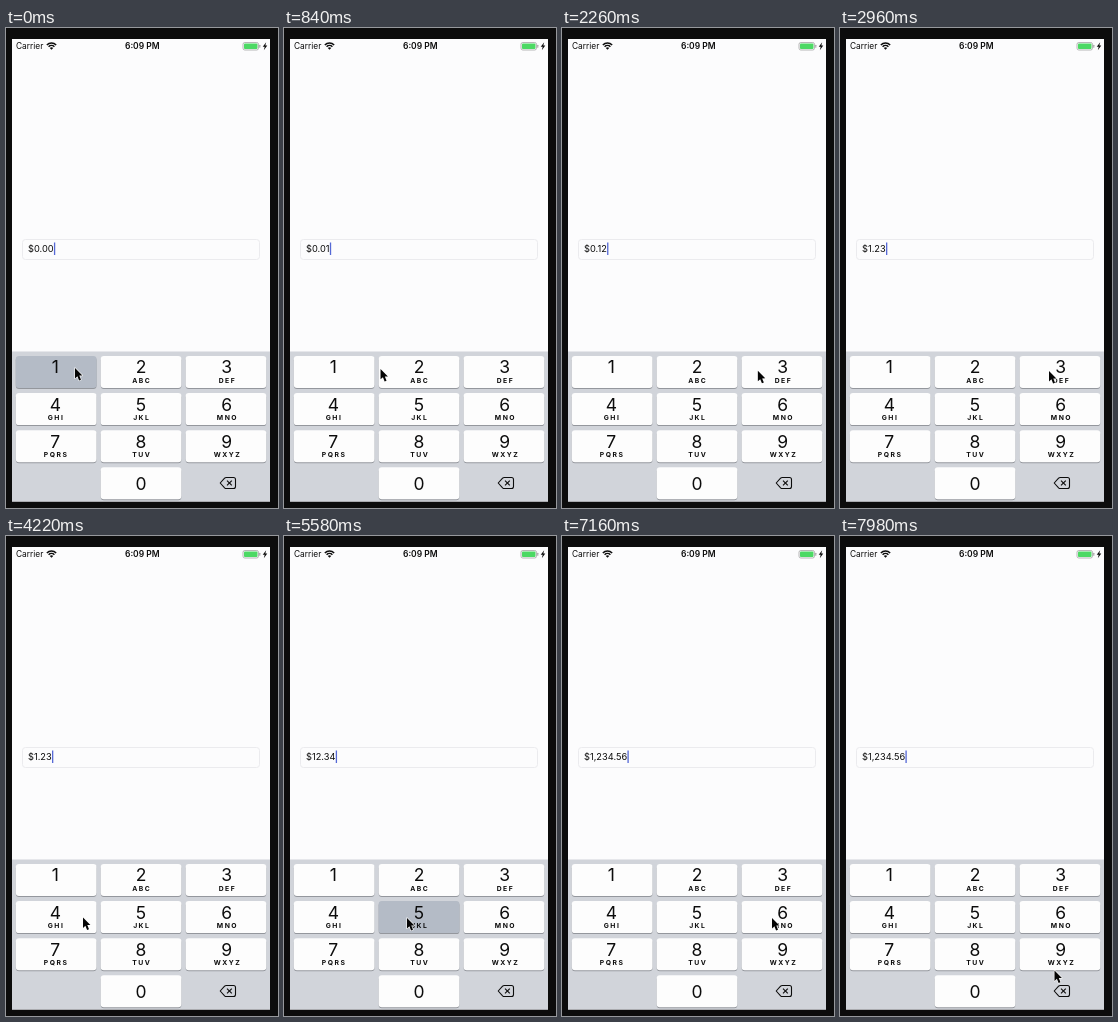
Recreate the animation shown at these times as an HTML page with a canvas. Size 272 px wide and 480 px high, loop 8000 ms.

```html
<!DOCTYPE html>
<html lang="en">
<head>
<meta charset="utf-8">
<title>Currency field</title>
<style>
html, body { margin: 0; width: 100%; height: 100%; overflow: hidden; background: #0c0c0c; }
canvas { display: block; width: 272px; height: 480px; }
</style>
</head>
<body>
<canvas id="stage"></canvas>
<script>
const W = 272, H = 480, LOOP = 8000;
const INK = '#0c0c0c', SANS = 'Inter, Roboto, sans-serif';
const canvas = document.getElementById('stage');
const ctx = canvas.getContext('2d');
const dpr = window.devicePixelRatio || 1;
canvas.width = W * dpr;
canvas.height = H * dpr;

const LETTERS = ['', 'ABC', 'DEF', 'GHI', 'JKL', 'MNO', 'PQRS', 'TUV', 'WXYZ'];

// Each tap: key, press time, time the digit lands, release time
const TAPS = [
  { key: 1, down: 0, type: 100, up: 150 },
  { key: 2, down: 1440, type: 1550, up: 1610 },
  { key: 3, down: 2740, type: 2840, up: 2900 },
  { key: 4, down: 4300, type: 4410, up: 4470 },
  { key: 5, down: 5510, type: 5620, up: 5680 },
  { key: 6, down: 6760, type: 6860, up: 6920 }
];

// Pointer moves: start, end, destination
const START = [69, 340];
const MOVES = [
  [450, 1250, 126, 342],
  [1700, 2450, 209, 343],
  [3300, 4120, 77, 381.5],
  [4650, 5380, 123, 382],
  [5800, 6400, 210, 382],
  [7400, 7940, 214.5, 434.5]
];

const ease = p => p * p * (3 - 2 * p);

function pointerAt(t) {
  let [x, y] = START;
  for (const [from, to, nx, ny] of MOVES) {
    if (t < from) break;
    const p = ease(Math.min(1, (t - from) / (to - from)));
    x += (nx - x) * p;
    y += (ny - y) * p;
  }
  return [x, y];
}

function amountAt(t) {
  let cents = 0;
  for (const tap of TAPS) if (t >= tap.type) cents = cents * 10 + tap.key;
  const whole = String(Math.floor(cents / 100)).replace(/\B(?=(\d{3})+$)/g, ',');
  return '$' + whole + '.' + String(cents % 100).padStart(2, '0');
}

function rect(x, y, w, h, fill) {
  ctx.fillStyle = fill;
  ctx.fillRect(x, y, w, h);
}

function round(x, y, w, h, r, fill) {
  ctx.beginPath();
  ctx.roundRect(x, y, w, h, r);
  ctx.fillStyle = fill;
  ctx.fill();
}

function outline(x, y, w, h, r, color, width) {
  ctx.beginPath();
  ctx.roundRect(x, y, w, h, r);
  ctx.strokeStyle = color;
  ctx.lineWidth = width;
  ctx.stroke();
}

function text(str, x, y, size, weight = 400, align = 'left', spacing = 0) {
  ctx.font = `${weight} ${size}px ${SANS}`;
  ctx.letterSpacing = spacing + 'px';
  ctx.textAlign = align;
  ctx.fillStyle = INK;
  ctx.fillText(str, x + (align === 'center' ? spacing / 2 : 0), y);
  const width = ctx.measureText(str).width;
  ctx.letterSpacing = '0px';
  return width;
}

function poly(points, close = true) {
  ctx.beginPath();
  points.forEach(([x, y]) => ctx.lineTo(x, y));
  if (close) ctx.closePath();
}

function line(x1, y1, x2, y2, color, width) {
  ctx.strokeStyle = color;
  ctx.lineWidth = width;
  poly([[x1, y1], [x2, y2]], false);
  ctx.stroke();
}

function drawStatusBar() {
  text('Carrier', 10, 21.2, 8.4);
  text('6:09 PM', 136.3, 21.2, 8.5, 600, 'center');

  // Wi-Fi
  ctx.strokeStyle = ctx.fillStyle = INK;
  ctx.lineWidth = 1.5;
  for (const r of [6.6, 4.1]) {
    ctx.beginPath();
    ctx.arc(45.5, 21.6, r, -Math.PI * 0.75, -Math.PI * 0.25);
    ctx.stroke();
  }
  ctx.beginPath();
  ctx.moveTo(45.5, 21.8);
  ctx.arc(45.5, 21.8, 2.4, -Math.PI * 0.75, -Math.PI * 0.25);
  ctx.fill();

  // Battery
  outline(237, 14.5, 15.5, 7.5, 1.8, '#9a9a9a', 0.7);
  round(238, 15.5, 13.5, 5.5, 0.9, '#4cd964');
  round(253.3, 16.8, 1, 2.9, 0.5, '#9a9a9a');
  poly([[260.2, 14.2], [256.7, 18.8], [258.7, 18.8], [257.8, 22.3], [261.3, 17.6], [259.3, 17.6]]);
  ctx.fillStyle = INK;
  ctx.fill();
}

function drawField(t) {
  outline(16.5, 211.5, 237, 20, 3, '#ebebee', 1);
  const width = text(amountAt(t), 22, 224.4, 9.25);
  rect(22.3 + width, 214.5, 1.3, 12.5, '#5569d6');
}

function drawKey(n, col, row, pressed) {
  const x = 9.8 + col * 84.9, y = 328 + row * 37.1;
  const mid = 135 + (col - 1) * 85.7;
  round(x, y + 1, 80.7, 32, 3.2, '#94979d');
  round(x, y, 80.7, 32, 3.2, pressed ? '#b4bbc6' : '#fdfdfd');
  text(String(n), mid, y + (n ? 17.4 : 22.2), 17.5, 400, 'center');
  if (n > 1) text(LETTERS[n - 1], mid, y + 27.1, 6.8, 700, 'center', 1.5);
}

function drawDelete() {
  ctx.lineJoin = 'round';
  ctx.strokeStyle = INK;
  ctx.lineWidth = 1.1;
  ctx.beginPath();
  ctx.moveTo(214.2, 455);
  ctx.lineTo(218.6, 450.2);
  ctx.quadraticCurveTo(219.3, 449.5, 220.3, 449.5);
  ctx.lineTo(227.5, 449.5);
  ctx.quadraticCurveTo(229.5, 449.5, 229.5, 451.5);
  ctx.lineTo(229.5, 458.5);
  ctx.quadraticCurveTo(229.5, 460.5, 227.5, 460.5);
  ctx.lineTo(220.3, 460.5);
  ctx.quadraticCurveTo(219.3, 460.5, 218.6, 459.8);
  ctx.closePath();
  ctx.stroke();
  line(221, 452.6, 225.8, 457.4, INK, 1.1);
  line(225.8, 452.6, 221, 457.4, INK, 1.1);
}

function drawKeyboard(t) {
  rect(6, 323.5, 258, 150, '#d1d4da');
  const active = TAPS.find(tap => t >= tap.down && t < tap.up);
  for (let i = 0; i < 9; i++) {
    drawKey(i + 1, i % 3, Math.floor(i / 3), active && active.key === i + 1);
  }
  drawKey(0, 1, 3, false);
  drawDelete();
}

function drawPointer(t) {
  const [x, y] = pointerAt(t);
  ctx.save();
  ctx.translate(x, y);
  poly([[0, 0], [0, 10.4], [2.4, 8.3], [4.1, 12.5], [6, 11.7], [4.3, 7.6], [7.4, 7.5]]);
  ctx.lineJoin = 'round';
  ctx.strokeStyle = 'rgba(255,255,255,.85)';
  ctx.lineWidth = 1.3;
  ctx.stroke();
  ctx.fillStyle = '#050505';
  ctx.fill();
  ctx.restore();
}

function draw(t) {
  ctx.setTransform(dpr, 0, 0, dpr, 0, 0);
  rect(0, 0, W, H, '#0c0c0c');
  rect(6, 11, 258, 462.5, '#fcfcfd');
  drawStatusBar();
  drawField(t);
  drawKeyboard(t);
  drawPointer(t);
}

const begin = performance.now();
function tick() {
  draw((performance.now() - begin) % LOOP);
  requestAnimationFrame(tick);
}
tick();
</script>
</body>
</html>
```
